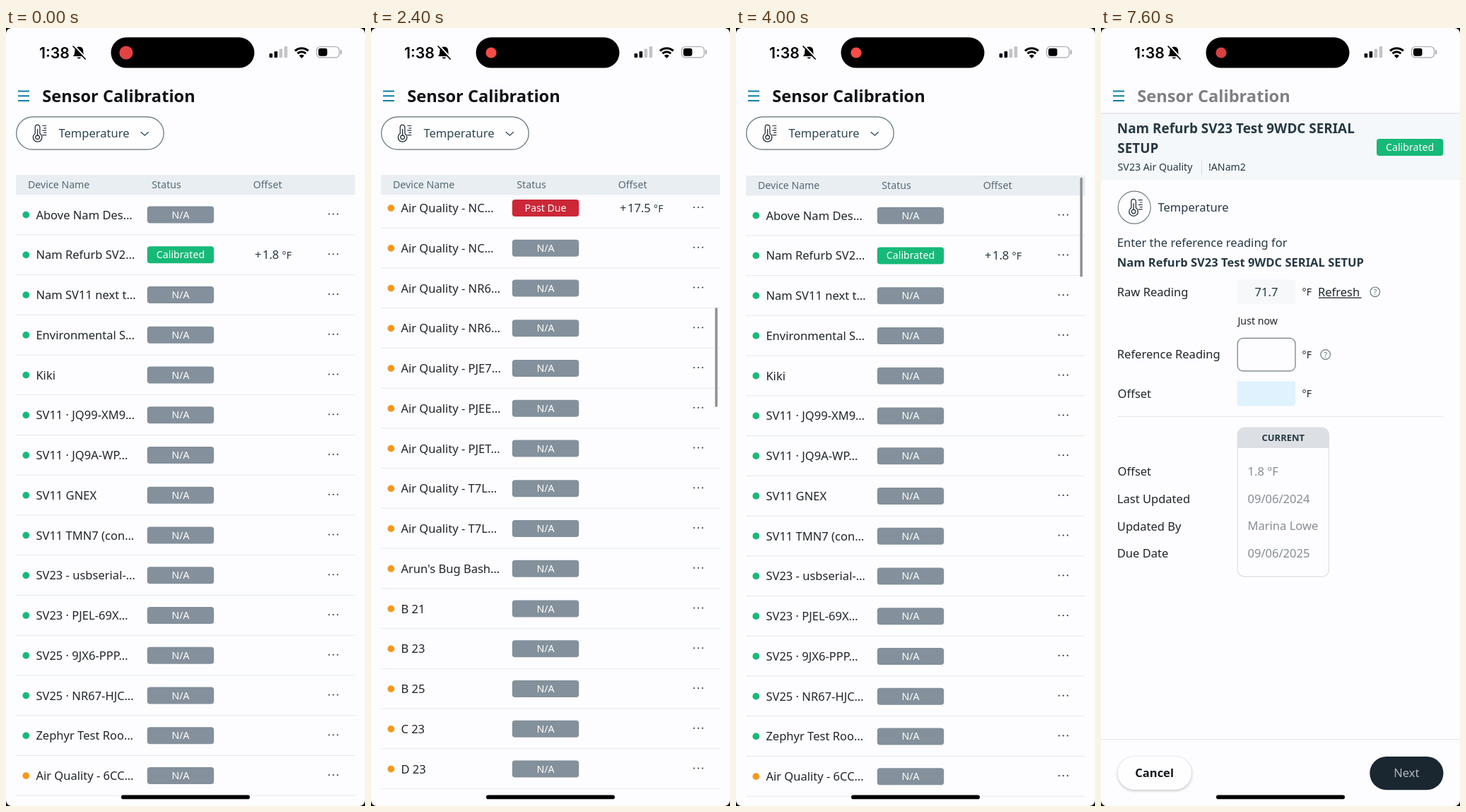
Recreate the animation shown at these times as an HTML page. Size 508 by 1102 pixels, loop 7700 ms.

```html
<!DOCTYPE html>
<html lang="en">
<head>
<meta charset="utf-8">
<title>Sensor Calibration</title>
<style>
html, body { margin: 0; width: 100%; height: 100%; overflow: hidden; background: #000; }
svg { display: block; width: 100%; height: 100%; }
text { font-family: "Noto Sans", "Open Sans", sans-serif; white-space: pre; }
</style>
</head>
<body>
<svg id="stage" viewBox="0 0 508 1102" xmlns="http://www.w3.org/2000/svg"></svg>
<script>
const LOOP = 7700, STEP = 100;
const ROW = 56.75, LIST_TOP = 208, LIST_END = 1089, HEAD_H = 28.4;
const S = 14.18, M = 16.54, L = 18.9, XL = 23.63;
const BG = '#fdfdff', INK = '#1f2529', SLATE = '#263843', GREEN = '#17b978';
const STATUS = { N: ['N/A', '#84909b'], C: ['Calibrated', GREEN], P: ['Past Due', '#cb2737'] };

const GREEN_ROWS = 14;
const ROWS = [
  'Above Nam Des…', 'Nam Refurb SV2…|C|+1.8', 'Nam SV11 next t…', 'Environmental S…', 'Kiki',
  'SV11 · JQ99-XM9…', 'SV11 · JQ9A-WP…', 'SV11 GNEX', 'SV11 TMN7 (con…', 'SV23 - usbserial-…',
  'SV23 · PJEL-69X…', 'SV25 · 9JX6-PPP…', 'SV25 · NR67-HJC…', 'Zephyr Test Roo…',
  'Air Quality - 6CC…', 'Air Quality - 9JX3…', 'Air Quality - 9JX9…|P|0', 'Air Quality - 9JXF…',
  'Air Quality - 9JX…', 'Air Quality - 9JX…|P|0', 'Air Quality - NC…|P|+17.5', 'Air Quality - NC…',
  'Air Quality - NR6…', 'Air Quality - NR6…', 'Air Quality - PJE7…', 'Air Quality - PJEE…',
  'Air Quality - PJET…', 'Air Quality - T7L…', 'Air Quality - T7L…', "Arun's Bug Bash…",
  'B 21', 'B 23', 'B 25', 'C 23', 'D 23', 'D 25'
];

// ---- drawing helpers ----
const text = (x, y, str, size, fill = INK, weight = 400, anchor = 'start', extra = '') =>
  `<text x="${x}" y="${y}" font-size="${size}" fill="${fill}" font-weight="${weight}" text-anchor="${anchor}" ${extra}>${str}</text>`;
const rect = (x, y, w, h, r, fill, extra = '') =>
  `<rect x="${x}" y="${y}" width="${w}" height="${h}" rx="${r}" fill="${fill}" ${extra}/>`;
const circle = (x, y, r, fill, extra = '') =>
  `<circle cx="${x}" cy="${y}" r="${r}" fill="${fill}" ${extra}/>`;
const path = (d, stroke, width, extra = '') =>
  `<path d="${d}" fill="none" stroke="${stroke}" stroke-width="${width}" ${extra}/>`;
const outline = (color, width = 1.2) => `stroke="${color}" stroke-width="${width}"`;

function badge(cx, cy, kind) {
  const [label, fill] = STATUS[kind];
  return rect(cx - 47.2, cy - 12, 94.4, 24, 4, fill) + text(cx, cy + 5, label, S, '#fff', 400, 'middle');
}

function thermometer(x, y) {
  const ticks = [0, 1, 2, 3, 4].map(i => `M${i % 2 ? 6.5 : 4.5} ${-10.5 + i * 3.3}H9.5`).join('');
  return `<g transform="translate(${x} ${y})" stroke-linecap="round">` +
    path('M-6 .5V-8.5a3.3 3.3 0 0 1 6.6 0V.5a6.3 6.3 0 1 1-6.6 0z', '#263038', 1.3) +
    circle(-2.7, 5.8, 2.8, 'none', outline('#263038', 1.3)) +
    path('M-2.7 3V-5.5', '#263038', 1.3) + path(ticks, '#263038', 1.2) + '</g>';
}

function help(x, y) {
  return circle(x, y, 6.8, 'none', outline('#6b7880')) +
    text(x, y + 4, '?', 11, '#6b7880', 500, 'middle');
}

function row(item, i) {
  const [name, kind = 'N', value] = item.split('|');
  const cy = 264.6 + i * ROW;
  let out = circle(28.3, cy, 4.9, i < GREEN_ROWS ? GREEN : '#f8981d') +
    text(42.4, cy + 6, name, M) + badge(247, cy, kind) +
    [457.2, 463.2, 469.2].map(x => circle(x, cy - 1, 1.1, '#33434d')).join('') +
    rect(14, cy + 27.6, 480, 1, 0, '#e3eaee');
  if (value) {
    const unit = `<tspan dx="4.3" font-size="${S}">°F</tspan>`;
    const plus = value[0] === '+';
    const num = plus ? `+<tspan dx="1.5">${value.slice(1)}</tspan>` : value;
    out += text(plus ? 352 : 355.3, cy + 6, num + unit, M, SLATE);
  }
  return out;
}

// ---- parts of the screen ----
function statusBar() {
  const bars = [6, 9, 12.5, 16].map((h, i) =>
    rect(372.6 + i * 7, 42 - h, 4.6, h, 1.3, i < 2 ? '#000' : '#c4c4c8')).join('');
  const bell = '<path d="M103.3 26.5c-4 0-6 2.8-6 6.5 0 4-1 5.3-2.4 7h16.8c-1.4-1.7-2.4-3-2.4-7 0-3.7-2-6.5-6-6.5zM100.6 41.4a2.8 2.8 0 0 0 5.4 0z"/>' +
    path('M96.5 24.7l17 18', BG, 2) + path('M95 26l17.2 18', '#000', 1.7, 'stroke-linecap="round"');
  const wifi = path('M409 32.4a13.6 13.6 0 0 1 18.8 0M412.5 36.2a8.6 8.6 0 0 1 11.8 0', '#000', 3) +
    '<path d="M418.4 43l-3.5-3.7a5 5 0 0 1 7 0z"/>';
  const battery = rect(439.7, 26.5, 31.8, 15.4, 5, 'none', outline('#a5a5aa')) +
    rect(442, 28.7, 12.5, 11, 3, '#000') + path('M474 32v4.6', '#a5a5aa', 1.8, 'stroke-linecap="round"');
  return text(47, 42.5, '1:38', 21.3, '#000', 600, 'start', 'style="font-family:Inter,sans-serif"') +
    bell + rect(148.5, 13.3, 203, 43.3, 21.65, '#000') +
    circle(170, 35, 7.6, '#e0403f', 'id="rec"') + bars + wifi + battery;
}

function topBar() {
  return path('M17 89.5H33M17 96.3H33M17 103.1H33', '#0b7ea4', 2) +
    text(51.2, 104.6, 'Sensor Calibration', XL, '#101214', 700, 'start', 'id="title"');
}

function listPage() {
  const head = rect(14, LIST_TOP, 480, HEAD_H, 0, '#e8eef2') +
    [[31, 'Device Name'], [206.3, 'Status'], [349.8, 'Offset']]
      .map(([x, s]) => text(x, 227, s, S, '#566975')).join('');
  return rect(14.7, 125.8, 208.5, 46.4, 23.2, '#fefeff', outline('#5d7078')) + thermometer(47.3, 149) +
    text(74.5, 155, 'Temperature', M, '#2f4550', 500) +
    path('M190.8 147.2l5.5 5 5.5-5', '#2f4550', 1.3) +
    `<g clip-path="url(#view)"><g id="rows">${ROWS.map(row).join('')}</g><g id="head">${head}</g></g>` +
    rect(486.8, 0, 3.6, 141, 1.8, '#929296', 'id="bar"');
}

function panel() {
  const x = 23.6, full = 'Nam Refurb SV23 Test 9WDC SERIAL';
  const facts = [['Offset', '1.8 °F'], ['Last Updated', '09/06/2024'],
    ['Updated By', 'Marina Lowe'], ['Due Date', '09/06/2025']];
  const unit = y => text(284.6, y, '°F', S, INK, 500);
  return rect(-1, 122, 510, 980, 0, '#000', 'opacity=".22" filter="url(#soft)"') +
    rect(0, 122, 508, 980, 0, BG) + rect(0, 122, 508, 94, 0, '#f5f8fb') +
    text(x - .8, 148.7, full, L, SLATE, 700) + text(x - .3, 177, 'SETUP', L, SLATE, 700) +
    text(x, 202, 'SV23 Air Quality', S, SLATE, 500) + rect(142, 187, 1, 21, 0, '#d5dce1') +
    text(152, 202, '!ANam2', S, SLATE) + badge(437.2, 169, 'C') +
    circle(47.2, 254.2, 23, BG, outline('#6f7d85')) + thermometer(48.8, 254.2) +
    text(80.5, 260, 'Temperature', M, SLATE, 500) +
    text(x - .8, 309.7, 'Enter the reference reading for', M, SLATE, 500) +
    text(x - .8, 338, full + ' SETUP', M, SLATE, 700) +
    text(x - .8, 379.7, 'Raw Reading', M) + rect(192.7, 356, 82.5, 35.5, 4, '#f6f8fa') +
    text(234, 379.7, '71.7', M, SLATE, 500, 'middle', 'id="reading"') + unit(379) +
    text(307, 379.7, 'Refresh', M, INK, 500) + rect(308, 381.5, 60.5, 1.3, 0, INK) + help(387.8, 373.8) +
    text(193.5, 420, 'Just now', S) +
    text(x - .8, 468.4, 'Reference Reading', M) +
    rect(193.2, 439.3, 81.8, 46.6, 8, BG, outline('#6f7d85')) + unit(467.6) + help(317.7, 462.5) +
    text(x, 524, 'Offset', M) + rect(192.7, 500.2, 82.5, 35.4, 4, '#dff2fd') + unit(523) +
    rect(x, 550, 460.8, 1, 0, '#e0e5e9') +
    '<path d="M193 595V576a10 10 0 0 1 10-10H312.6a10 10 0 0 1 10 10V595z" fill="#dcdfe4"/>' +
    rect(193.2, 566.2, 129.3, 211, 10, 'none', outline('#dadfe4')) +
    text(257.8, 585.4, 'CURRENT', 13, SLATE, 700, 'middle') +
    facts.map(([k, v], i) => text(i ? x - .8 : x, 634 + i * 38.8, k, M) +
      text(207.5, 634 + i * 38.6, v, M, '#858d94')).join('') +
    rect(0, 1007, 508, 1.2, 0, '#e4e8eb') +
    rect(24, 1033.5, 104, 46.5, 23.2, '#000', 'opacity=".28" filter="url(#soft)"') +
    rect(23.8, 1032, 104.2, 47, 23.5, '#fefeff') +
    text(75.6, 1061.2, 'Cancel', M, '#16191b', 600, 'middle') +
    rect(380.3, 1032, 104.2, 47.2, 23.6, '#1a2630') +
    text(432.4, 1061.2, 'Next', M, '#b1b6ba', 500, 'middle');
}

const stage = document.getElementById('stage');
stage.innerHTML = `<defs>
  <clipPath id="screen"><rect width="508" height="1102" rx="8"/></clipPath>
  <clipPath id="view"><rect y="${LIST_TOP}" width="508" height="${LIST_END - LIST_TOP}"/></clipPath>
  <filter id="soft" x="-10%" y="-20%" width="120%" height="140%"><feGaussianBlur stdDeviation="2"/></filter>
  </defs><rect width="508" height="1102"/>
  <g clip-path="url(#screen)">${rect(0, 0, 508, 1102, 0, BG)}${statusBar()}${topBar()}${listPage()}
  ${rect(0, 122, 508, 980, 0, '#000', 'id="dim"')}<g id="panel">${panel()}</g>
  ${rect(163, 1086.6, 182, 5.6, 2.8, '#000')}</g>`;

const $ = id => document.getElementById(id);
const [rows, head, bar, dim, sheet, title, rec, reading] =
  ['rows', 'head', 'bar', 'dim', 'panel', 'title', 'rec', 'reading'].map($);

// ---- motion ----
const clamp = v => Math.min(1, Math.max(0, v));
const ramp = (t, from, to) => clamp((t - from) / (to - from));

const DRAGS = [[500, 0], [650, 70], [850, 260], [1150, 420], [1600, 498.3], [1750, 530],
  [1900, 730], [2100, 960], [2400, 1144.5], [2600, 1174], [2740, 1172], [2850, 1111]];
const HIT = 3415, SPEED = 1060, FRICTION = 2, SPRING = 10.9;

function alongDrags(t) {
  const i = Math.max(1, DRAGS.findIndex(k => k[0] >= t));
  const slope = n => {
    const a = DRAGS[n - 1], b = DRAGS[n + 1];
    return a && b ? (b[1] - a[1]) / (b[0] - a[0]) : 0;
  };
  const [t0, p0] = DRAGS[i - 1], [t1, p1] = DRAGS[i];
  const d = t1 - t0, u = (t - t0) / d, v = 1 - u;
  return v * v * (1 + 2 * u) * p0 + u * u * (3 - 2 * u) * p1 +
    d * u * v * (v * slope(i - 1) - u * slope(i));
}

// Two drags down, a fling that slows by friction, then a damped bounce at the top.
function scrollAt(t) {
  if (t <= 500) return 0;
  if (t < 2850) return alongDrags(t);
  const s = (t - HIT) / 1000;
  if (s < 0) return SPEED / FRICTION * (Math.exp(-FRICTION * s) - 1);
  return t < 4200 ? -SPEED * s * Math.exp(-SPRING * s) : 0;
}

function easeOut(x) {
  if (x <= 0 || x >= 1) return clamp(x);
  const curve = (a, b, s) => 3 * a * s * (1 - s) ** 2 + 3 * b * s * s * (1 - s) + s ** 3;
  let lo = 0, hi = 1;
  for (let i = 0; i < 20; i++) {
    const mid = (lo + hi) / 2;
    if (curve(.25, .25, mid) < x) lo = mid; else hi = mid;
  }
  return curve(.8, 1, lo);
}

function draw(t) {
  const pos = scrollAt(t);
  rows.setAttribute('transform', `translate(0 ${-pos})`);
  head.setAttribute('transform', `translate(0 ${Math.max(0, -pos)})`);
  bar.setAttribute('y', 211.8 + Math.max(-1, pos * .161));
  bar.setAttribute('opacity', ramp(t, 480, 600) * (1 - ramp(t, 4100, 4400)));

  const open = easeOut(ramp(t, 4718, 5118));
  sheet.setAttribute('transform', `translate(${508 * (1 - open)} 0)`);
  sheet.setAttribute('visibility', open > 0 ? 'visible' : 'hidden');
  dim.setAttribute('opacity', .3 * ramp(open, 0, .9));
  title.setAttribute('opacity', 1 - .47 * ramp(open, 0, .9));
  reading.setAttribute('opacity', t >= 5500 ? 1 : 0);

  const glow = .5 + .5 * Math.cos(2 * Math.PI * (t / 1500 - .72));
  rec.setAttribute('fill', `rgb(${207 + 48 * glow},${60 + 17 * glow},${64 + 6 * glow})`);
  rec.setAttribute('r', 9.6 - 2 * ramp(t, 0, 300));
}

// The screen refreshes ten times a second.
function tick(now) {
  draw(Math.floor(now % LOOP / STEP) * STEP);
  requestAnimationFrame(tick);
}
draw(0);
requestAnimationFrame(tick);
</script>
</body>
</html>
```
